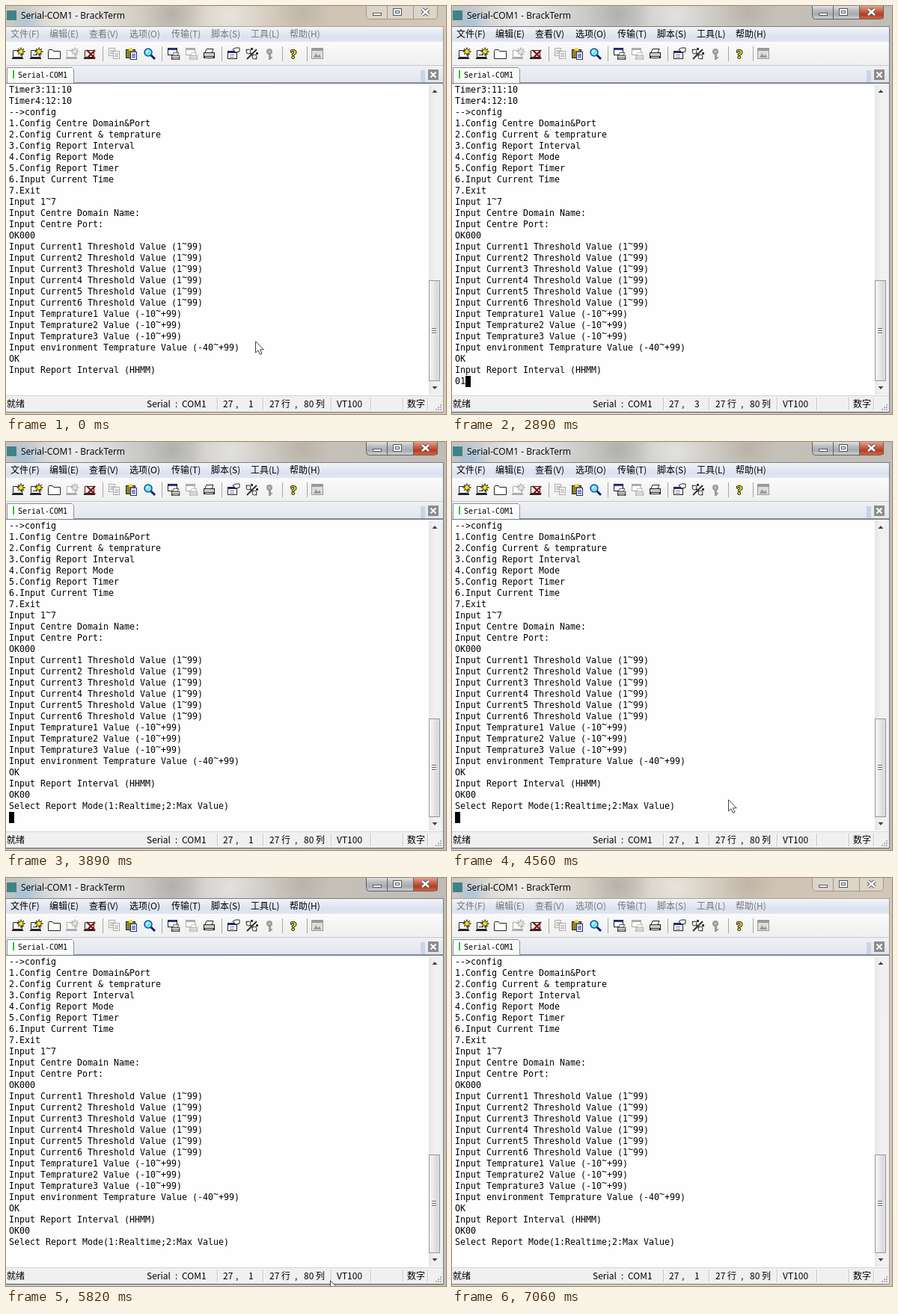
Recreate the animation shown at these times as an HTML page with a canvas. Size 588 by 546 pixels, loop 7.15 s.

```html
<!DOCTYPE html>
<html lang="zh-CN">
<head>
<meta charset="utf-8">
<title>Serial-COM1</title>
<style>
html, body { margin: 0; width: 100%; height: 100%; overflow: hidden; background: #f0f0f0; }
canvas { display: block; width: 588px; height: 546px; }
</style>
</head>
<body>
<canvas id="stage" width="588" height="546"></canvas>
<script>
const ctx = document.getElementById('stage').getContext('2d');
const LOOP = 7150;
const MONO = '"DejaVu Sans Mono", monospace';
const UI = '"Noto Sans CJK SC", "Noto Sans CJK", sans-serif';

const INTRO = ['Timer3:11:10', 'Timer4:12:10'];
const LOG = [
  '-->config', '1.Config Centre Domain&Port', '2.Config Current & temprature',
  '3.Config Report Interval', '4.Config Report Mode', '5.Config Report Timer',
  '6.Input Current Time', '7.Exit', 'Input 1~7', 'Input Centre Domain Name:',
  'Input Centre Port:', 'OK000',
  ...[1, 2, 3, 4, 5, 6].map(n => `Input Current${n} Threshold Value (1~99)`),
  ...[1, 2, 3].map(n => `Input Temprature${n} Value (-10~+99)`),
  'Input environment Temprature Value (-40~+99)', 'OK', 'Input Report Interval (HHMM)'
];
const REPLY = ['OK00', 'Select Report Mode(1:Realtime;2:Max Value)'];

// [start time, x, y]; no position means the pointer is hidden
const POINTER = [
  [0, 333, 448], [2030, 348, 449], [2610], [4290, 381, 450], [4410, 382, 450],
  [4560, 369, 478], [4710, 396, 505], [4830, 403, 513], [5110, 406, 516],
  [5260, 411, 519], [5390, 415, 522], [5670, 419, 525], [5820, 433, 538], [5940]
];
const TYPED = [2610, 2890, 3200, 3480];
const BLINK = [1620, 2610, 2890, 3350, 3480, 3620, 3750, 4710, 5260, 5670, 6220, 6780];

function rect(color, x, y, w, h) {
  ctx.fillStyle = color;
  ctx.fillRect(x, y, w, h);
}
function frame(color, x, y, w, h) {
  ctx.strokeStyle = color;
  ctx.lineWidth = 1;
  ctx.strokeRect(x + 0.5, y + 0.5, w - 1, h - 1);
}
function text(s, x, y, font, color = '#000') {
  ctx.font = font;
  ctx.fillStyle = color;
  ctx.fillText(s, x, y);
}
function path(points, fill, stroke, width = 1, close = true) {
  ctx.beginPath();
  points.forEach(([x, y]) => ctx.lineTo(x, y));
  if (close) ctx.closePath();
  if (fill) { ctx.fillStyle = fill; ctx.fill(); }
  if (stroke) { ctx.strokeStyle = stroke; ctx.lineWidth = width; ctx.stroke(); }
}
function line(color, width, ...points) {
  path(points, null, color, width, false);
}
function circle(x, y, r, fill, stroke, width = 1) {
  ctx.beginPath();
  ctx.arc(x, y, r, 0, Math.PI * 2);
  if (fill) { ctx.fillStyle = fill; ctx.fill(); }
  if (stroke) { ctx.strokeStyle = stroke; ctx.lineWidth = width; ctx.stroke(); }
}
function grad(x0, y0, x1, y1, ...colors) {
  const g = ctx.createLinearGradient(x0, y0, x1, y1);
  colors.forEach((c, i) => g.addColorStop(i / (colors.length - 1), c));
  return g;
}
function at(x, y, draw) {
  ctx.save();
  ctx.translate(x, y);
  draw();
  ctx.restore();
}

function glow(x, y, r, rgb, alpha) {
  const g = ctx.createRadialGradient(x, y, 0, x, y, r);
  g.addColorStop(0, `rgba(${rgb},${alpha})`);
  g.addColorStop(1, `rgba(${rgb},0)`);
  rect(g, 0, 0, 588, 28);
}

function titleBar(active) {
  const tint = active
    ? ['#c3c4c4', '#cbcac8', '#d0cdc8', '#c5c0b8', '#c0bcb6']
    : ['#cfcac1', '#d3cdc3', '#d8d0c4', '#cfc4b4', '#d3c8b8'];
  rect(grad(0, 0, 588, 0, ...tint), 0, 0, 588, 546);
  glow(28, 22, 24, '130,185,230', .55);
  glow(222, 10, 45, '135,135,130', .4);
  glow(300, 12, 55, '255,255,255', .4);
  glow(395, 8, 40, '150,138,120', .3);
  glow(95, 13, 80, '255,255,255', .65);
  rect('#3f8288', 1, 6, 13, 13);
  text('Serial-COM1 - BrackTerm', 20, 17, '12px "Open Sans", "Noto Sans", sans-serif');
  windowButtons(active);
}

function windowButtons(active) {
  const edge = active ? '#5d6063' : '#9d968b';
  const face = active
    ? grad(0, 0, 0, 17, '#dfe1e3', '#b9bdc0', '#a7abae', '#ced1d3')
    : 'rgba(255,255,255,.25)';
  rect(face, 481, 0, 64, 17);
  if (active) rect(grad(0, 0, 0, 17, '#e0a28f', '#cf6a50', '#b93a20', '#d3663e'), 545, 0, 32, 17);
  else rect(face, 545, 0, 32, 17);
  ctx.beginPath();
  ctx.moveTo(481.5, 0);
  ctx.arcTo(481.5, 17.5, 490, 17.5, 4);
  ctx.arcTo(576.5, 17.5, 576.5, 0, 4);
  ctx.lineTo(576.5, 0);
  ctx.strokeStyle = edge;
  ctx.lineWidth = 1;
  ctx.stroke();
  rect(edge, 509, 0, 1, 17);
  rect(edge, 544, 0, 1, 17);
  const dark = '#54575d';
  rect(dark, 490, 9, 12, 4);
  rect('#fff', 491, 10, 10, 2);
  rect(dark, 517, 3, 12, 10);
  rect('#fff', 518, 4, 10, 8);
  rect(dark, 520, 6, 6, 4);
  rect('#eee', 521, 7, 4, 2);
  for (const [c, w] of [[dark, 4.5], ['#fff', 2.5]]) {
    line(c, w, [556, 4], [565, 12]);
    line(c, w, [565, 4], [556, 12]);
  }
}

function menuBar(active) {
  rect(grad(0, 28, 0, 48, '#f2f5fa', '#e6eaf4', '#dce2ef', '#e0e5f1'), 0, 28, 584, 20);
  rect(active ? '#7a7d80' : '#aaa398', 0, 27, 584, 1);
  const items = [['文件(F)', 6], ['编辑(E)', 58], ['查看(V)', 111], ['选项(O)', 165],
    ['传输(T)', 221], ['脚本(S)', 274], ['工具(L)', 327], ['帮助(H)', 379]];
  items.forEach(([s, x]) => text(s, x, 42, '12px ' + UI, active ? '#000' : '#777'));
}

function burst(x, y, fill, edge) {
  const star = [...Array(16).keys()].map(i => {
    const r = i % 2 ? 2.5 : 5.5;
    return [x + r * Math.cos(i * Math.PI / 8), y + r * Math.sin(i * Math.PI / 8)];
  });
  path(star, fill, edge, 0.8);
}
function folder(edge) {
  path([[0.5, 3.5], [1.5, 1.5], [6, 1.5], [7.5, 3.5], [16.5, 3.5], [16.5, 13.5], [0.5, 13.5]], '#fff', edge);
}
function session(edge, fill) {
  path([[1.5, 2.5], [13.5, 2.5], [13.5, 11.5], [1.5, 11.5]], '#fff', edge);
  rect(edge, 0, 12, 15, 2);
  burst(12, 4, fill, edge);
}
function page(x, y, edge, fill) {
  rect(fill, x, y, 9, 11);
  frame(edge, x, y, 9, 11);
  for (let i = 3; i < 9; i += 2) rect(edge, x + 2, y + i, 5, 1);
}
function panel(edge, bar) {
  rect('#fff', 0, 0, 13, 10);
  frame(edge, 0, 0, 13, 10);
  rect(bar, 1, 1, 11, 2);
}
function printer(edge, face) {
  path([[4, 0.5], [13, 0.5], [11, 5.5], [2, 5.5]], '#fff', edge);
  rect(edge, 0, 5, 15, 8);
  rect(face, 1, 6, 13, 4);
  rect('#fff', 2, 11, 11, 1);
}
function screenPrint(edge, bar, face) {
  panel(edge, bar);
  at(5, 6, () => { ctx.scale(.75, .75); printer(edge, face); });
}

function toolbar() {
  rect(grad(0, 48, 0, 79, '#fbfbfc', '#f4f4f5', '#f0f0f0'), 0, 48, 584, 32);
  rect('#c8c9cc', 0, 79, 584, 1);
  [129, 208, 288, 369, 402].forEach(x => rect('#a5a5a5', x, 54, 1, 20));
  at(8, 57, () => session('#222', '#ffe800'));
  at(32, 57, () => { session('#222', '#ffe800'); rect('#222', 4, 8, 6, 1); });
  at(56, 57, () => folder('#222'));
  at(80, 57, () => session('#aaa', '#e4e4e4'));
  at(104, 57, () => {
    path([[1.5, 2.5], [13.5, 2.5], [13.5, 11.5], [1.5, 11.5]], '#fff', '#222');
    rect('#222', 0, 12, 15, 2);
    line('#8e1212', 2.4, [4, 2], [15, 13]);
    line('#8e1212', 2.4, [15, 2], [4, 13]);
  });
  at(137, 56, () => { page(0, 0, '#aaa', '#f8f8f8'); page(6, 4, '#aaa', '#f8f8f8'); });
  at(160, 56, () => {
    rect('#8d8327', 0, 2, 13, 12);
    frame('#222', 0, 2, 13, 12);
    rect('#e8d94c', 4, 0, 5, 4);
    page(6, 5, '#1c2d84', '#fff');
  });
  at(184, 56, () => {
    line('#17256f', 3, [9, 9], [15, 15]);
    circle(6, 6, 5, '#6fe6f4', '#1b4d8c', 1.5);
    line('#fff', 1.2, [3.5, 6], [6, 3.5]);
  });
  at(216, 56, () => screenPrint('#222', '#2437a0', '#ccc'));
  at(240, 56, () => screenPrint('#aaa', '#aaa', '#ddd'));
  at(264, 57, () => printer('#222', '#ccc'));
  at(296, 56, () => {
    rect('#fff', 0, 4, 13, 11);
    frame('#222', 0, 4, 13, 11);
    rect('#1b2b88', 1, 5, 11, 2);
    rect('#666', 3, 9, 6, 1);
    rect('#666', 3, 12, 6, 1);
    path([[7, 2], [11, 0], [16, 0], [16, 5], [11, 6]], '#fff', '#222');
  });
  at(320, 56, () => {
    line('#333', 2, [1, 2], [15, 15]);
    line('#333', 2, [15, 2], [2, 15]);
    circle(4, 5, 3, '#eee', '#333');
    circle(12, 12, 3, '#eee', '#333');
    rect('#333', 7, 0, 3, 3);
    rect('#333', 14, 6, 3, 3);
  });
  at(348, 57, () => {
    circle(4, 4, 3, '#bbb', '#999', 2);
    rect('#999', 3, 7, 3, 8);
    rect('#999', 6, 11, 2, 2);
  });
  ctx.lineJoin = 'round';
  ctx.font = 'bold 17px "Liberation Serif", serif';
  ctx.strokeStyle = '#222';
  ctx.lineWidth = 2;
  ctx.strokeText('?', 380, 70);
  text('?', 380, 70, ctx.font, '#f5e600');
  ctx.lineJoin = 'miter';
  at(408, 56, () => {
    rect('#dedede', 0, 0, 16, 15);
    frame('#999', 0, 0, 16, 15);
    rect('#999', 1, 1, 14, 3);
    path([[3, 13], [6, 7], [9, 11], [11, 8], [13, 13]], '#999');
  });
}

function tabBar() {
  rect(grad(0, 80, 0, 104, '#eef0f4', '#e1e5ec'), 0, 80, 584, 24);
  rect(grad(0, 82, 0, 103, '#fff', '#f8f9fb'), 1, 82, 90, 22);
  path([[1.5, 103], [1.5, 82.5], [88.5, 82.5], [90.5, 84.5], [90.5, 103]], null, '#8b909a', 1, false);
  rect('#8b909a', 91, 102, 493, 1);
  rect('#2fc42f', 9, 86, 2, 11);
  text('Serial-COM1', 16, 96, '9.97px ' + MONO);
  rect('#c8d4e5', 554, 86, 6, 16);
  rect('#8c8c8c', 564, 85, 14, 14);
  line('#fff', 2, [567.5, 88.5], [574.5, 95.5]);
  line('#fff', 2, [574.5, 88.5], [567.5, 95.5]);
}

function termLine(s, row) {
  const y = 116 + row * 15;
  const font = '11.63px ' + MONO;
  text(s.replace(/~/g, ' '), 4, y, font);
  // tildes sit at cap height
  [...s].forEach((c, i) => { if (c === '~') text(c, 4 + i * 7, y - 4, font); });
}

function terminal(t) {
  rect('#fdfefd', 0, 104, 584, 418);
  rect('#777c85', 0, 103, 584, 1);
  const scrolled = t >= 3890;
  const input = scrolled ? '' : '0100'.slice(0, TYPED.filter(k => t >= k).length);
  const rows = scrolled ? [...LOG, ...REPLY] : [...INTRO, ...LOG];
  [...rows, input].forEach(termLine);
  const col = t >= 3750 ? 0 : input.length;
  if (BLINK.filter(k => t >= k).length % 2) {
    const x = 4 + col * 7;
    rect('#000', x, 495, 7, 15);
    if (input[col]) text(input[col], x, 506, '11.63px ' + MONO, '#fff');
  }
  scrollBar(scrolled ? 370 : 367);
  return col + 1;
}

function scrollBar(top) {
  rect('#f0f0f0', 581, 104, 3, 418);
  rect(grad(565, 0, 581, 0, '#e6e6e6', '#f2f2f2', '#f0f0f0'), 565, 105, 16, 415);
  path([[569.5, 116], [573, 112], [576.5, 116]], '#444');
  path([[569.5, 509], [573, 513], [576.5, 509]], '#444');
  const h = 502 - top;
  rect(grad(565, 0, 580, 0, '#f6f6f6', '#ededee', '#dcdcde', '#dedee0'), 565, top, 15, h);
  frame('#979797', 565, top, 15, h);
  const mid = Math.round(top + h / 2) - 4;
  for (let i = 0; i < 3; i++) {
    rect('#62656b', 569, mid + i * 3, 6, 1);
    rect('#fff', 569, mid + i * 3 + 1, 6, 1);
  }
}

function statusBar(col, active) {
  rect('#f0f0f0', 0, 521, 584, 23);
  rect('#d5d5d5', 0, 521, 584, 1);
  [282, 343, 434, 487, 530, 563].forEach(x => {
    rect('#c4c4c4', x, 524, 1, 17);
    rect('#fff', x + 1, 524, 1, 17);
  });
  const items = [['就绪', 1], ['Serial', 188], [':', 226], ['COM1', 235], ['27', 290], [',', 307],
    [col, 324], ['27 行', 352], [',', 386], ['80 列', 398], ['VT100', 442], ['数字', 536]];
  items.forEach(([s, x]) => text(s, x, 537, '12px ' + UI));
  for (let i = 0; i < 3; i++)
    for (let j = 0; j <= i; j++) rect('#b0b0b0', 580 - j * 3, 533 + i * 3, 2, 2);
  rect(active ? '#54585c' : '#857e74', 0, 543, 585, 1);
  rect(active ? '#777b80' : '#a39a8c', 584, 27, 1, 517);
}

function pointer(x, y) {
  at(x, y, () => path([[0.5, 0.8], [0.5, 16], [4, 12.8], [6.4, 18.3], [9, 17.2],
    [6.6, 11.8], [11.3, 11.8]], '#fff', '#3a3f4a'));
}

function draw(t) {
  const active = t >= 1620 && t < 7060;
  titleBar(active);
  menuBar(active);
  toolbar();
  tabBar();
  const col = terminal(t);
  statusBar(col, active);
  const [, x, y] = POINTER.filter(p => t >= p[0]).pop();
  if (x) pointer(x, y);
}

const start = performance.now();
function tick() {
  draw((performance.now() - start) % LOOP);
  requestAnimationFrame(tick);
}
tick();
</script>
</body>
</html>
```
